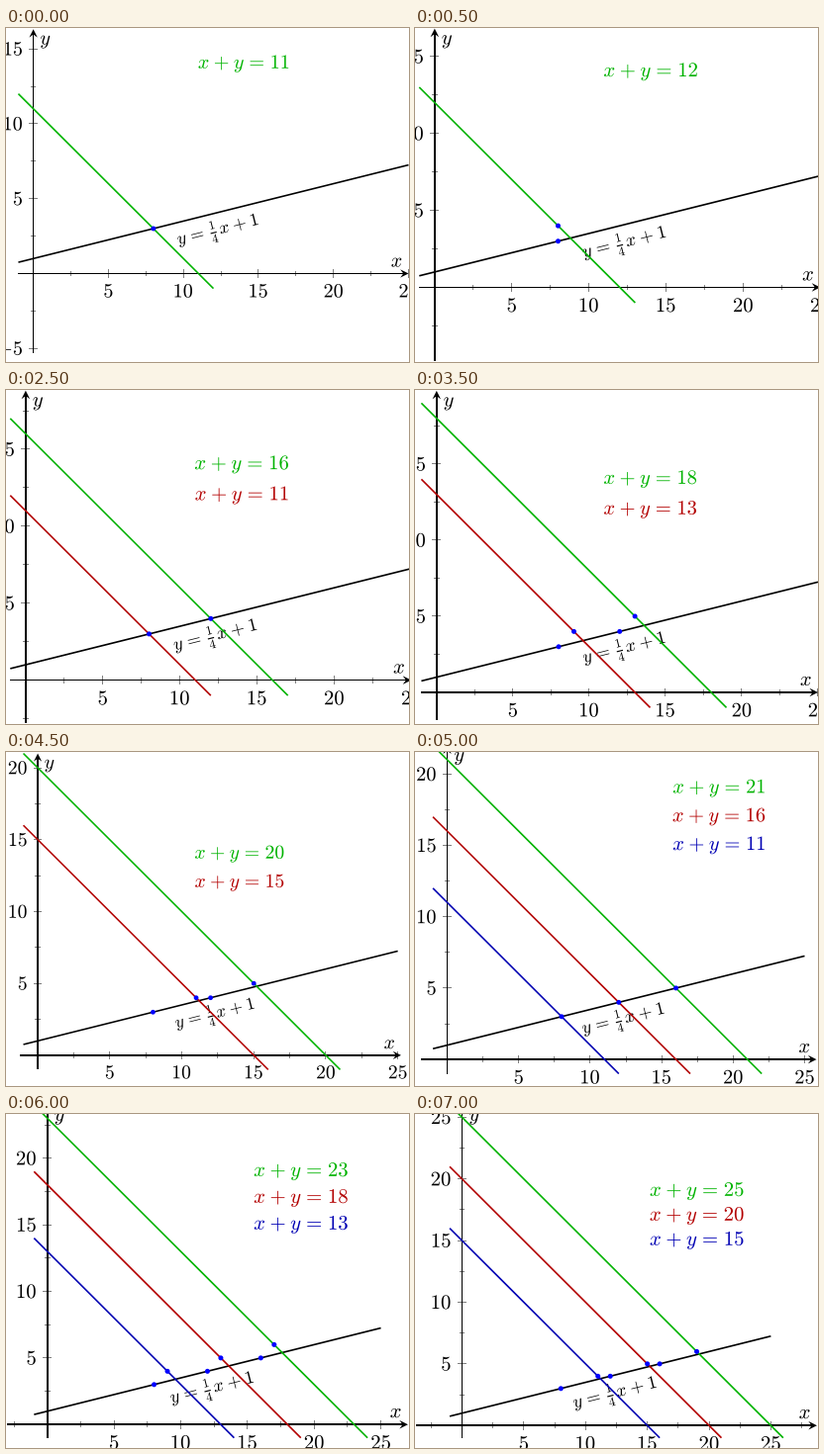
Write a matplotlib script that moves like this. It is 407x338 px and loops after 7.5 s.

```python
import numpy as np
import matplotlib.pyplot as plt
from matplotlib.animation import FuncAnimation
from matplotlib.patches import Circle, PathPatch, Polygon, Rectangle
from matplotlib.textpath import TextPath
from matplotlib.transforms import Affine2D

W, H, DPI = 407, 338, 64
EM = 20.7                      # text size in pixels at scale 1
BOX_W, BOX_H = 405, 336.8      # axis box in pixels at scale 1
LINE = 1.66
GREEN, RED, BLUE = (0, .7, 0), (.7, 0, 0), (0, 0, .7)
GRAY = (.5, .5, .5)
SLOPE = np.arctan(1 / 4)

plt.rcParams["mathtext.fontset"] = "cm"

fig = plt.figure(figsize=(W / DPI, H / DPI), dpi=DPI, facecolor="white")
ax = fig.add_axes([0, 0, 1, 1])

PLUS = r"\hspace{0.053}+\hspace{0.053}"
EQUALS = r"\hspace{0.117}=\hspace{0.117}"

# first total, scale, centre x, centre y of the axis box
LAYOUTS = [
    (11, .973, 209.5, 165.1),
    (12, 1.0, 206.8, 169.0),
    (18, .989, 206.7, 167.35),
    (19, .97, 206.6, 164.4),
    (20, .95, 206.6, 161.45),
    (21, .986, 205.8, 159.5),
    (22, .987, 205.95, 160.45),
    (23, 1.0, 203.45, 159.3),
]


def text(x, y, s, scale, align=.5, color="black", em=EM, angle=0):
    """Text as outlines; align is 0 for left, .5 for centre, 1 for right."""
    path = TextPath((0, 0), f"${s}$", size=em * scale)
    box = path.get_extents()
    move = (Affine2D().translate(-box.x0 - align * box.width, 0)
            .scale(1, -1).rotate(-angle).translate(x, y))
    ax.add_patch(PathPatch(move.transform_path(path), color=color, lw=0,
                           zorder=3))


def line(xs, ys, width, color="black"):
    ax.plot(xs, ys, color=color, lw=width * 72 / DPI,
            solid_capstyle="butt", snap=False, zorder=4)


def edges(c, width):
    """Whole-pixel edges of a stroke centred on c."""
    lo, hi = round(c - width / 2), round(c + width / 2)
    return (lo, hi) if hi > lo else (int(c), int(c) + 1)


def bar(x0, x1, y0, y1, color, z):
    ax.add_patch(Rectangle((x0, y0), x1 - x0, y1 - y0, color=color, lw=0,
                           zorder=z))


def hbar(x0, x1, y, width, color="black", z=2):
    bar(x0, x1, *edges(y, width), color, z)


def vbar(x, y0, y1, width, color="black", z=2):
    bar(*edges(x, width), y0, y1, color, z)


def arrow(x, y, dx, dy, scale):
    """Stealth tip ending at (x, y), pointing along (dx, dy)."""
    u = 1.076 * scale
    shape = [(0, 0), (-8, 4), (-5, 0), (-8, -4)]
    pts = [(x + u * (a * dx - b * dy), y + u * (a * dy + b * dx))
           for a, b in shape]
    ax.add_patch(Polygon(pts, color="black", lw=0, zorder=3))


def draw(i):
    n = 11 + i
    _, s, cx, cy = [row for row in LAYOUTS if row[0] <= n][-1]
    ax.clear()
    ax.set(xlim=(0, W), ylim=(H, 0))
    ax.axis("off")

    # equal units, view centred on the plotted range
    x_max = max(25, n + 1)
    unit = s * min(BOX_W / (x_max + 1), BOX_H / (n + 2))
    ox = cx - unit * (x_max - 1) / 2
    oy = cy + unit * n / 2
    left, right = cx - s * BOX_W / 2, cx + s * BOX_W / 2
    top, bottom = cy - s * BOX_H / 2, cy + s * BOX_H / 2

    def px(x):
        return ox + unit * x

    def py(y):
        return oy - unit * y

    # ticks every 2.5, labels every 5
    for k in range(-4, 13):
        if k == 0:
            continue
        v, major = 2.5 * k, k % 2 == 0
        r = s * (4.4 if major else 2.95)
        if left <= px(v) <= right + .5:
            vbar(px(v), oy - r, oy + r, .4, GRAY, 1)
            if major:
                text(px(v), oy + 24.7 * s, f"{v:.0f}", s)
        if top <= py(v) <= bottom:
            hbar(ox - r, ox + r, py(v), .4, GRAY, 1)
            if major:
                text(ox - 12 * s, py(v) + 6.67 * s, f"{v:.0f}", s, 1)

    # axes
    hbar(left, right - 4 * s, oy, LINE * s)
    vbar(ox, top + 4 * s, bottom, LINE * s)
    arrow(right, oy, 1, 0, s)
    arrow(ox, top, 0, -1, s)
    text(right - 7.4 * s, oy - 7 * s, "x", s, 1)
    text(ox + 7.5 * s, top + 15.8 * s, "y", s, 0)

    # fixed line with its sloped label
    line([px(-1), px(25)], [py(.75), py(7.25)], LINE * s)
    text(px(12) + 22.4 * s * np.sin(SLOPE), py(4) + 22.4 * s * np.cos(SLOPE),
         r"y" + EQUALS + r"\hspace{0.1}\frac{1}{4}\hspace{0.06}x" + PLUS + "1",
         s, em=18.4, angle=SLOPE)

    # moving lines x + y = total, five apart
    anchor = 14 if n < 21 else 19
    dots = set()
    for j, color in enumerate((GREEN, RED, BLUE)):
        total = n - 5 * j
        if total < 11:
            break
        line([px(-1), px(total + 1)], [py(total + 1), py(-1)], LINE * s, color)
        text(px(anchor), py(anchor - 2 * j) + 4.7 * s,
             "x" + PLUS + "y" + EQUALS + str(total), s, color=color)
        y = -(-(total + 4) // 5)
        dots.add((total - y, y))
        dots.add((4 * (2 + j), 3 + j))

    for x, y in sorted(dots):
        ax.add_patch(Circle((px(x), py(y)), 2.5 * s, color="blue", lw=0,
                            zorder=6))
    return []


anim = FuncAnimation(fig, draw, frames=15, interval=500, repeat=True,
                     repeat_delay=0, init_func=lambda: draw(0))
plt.show()
```
